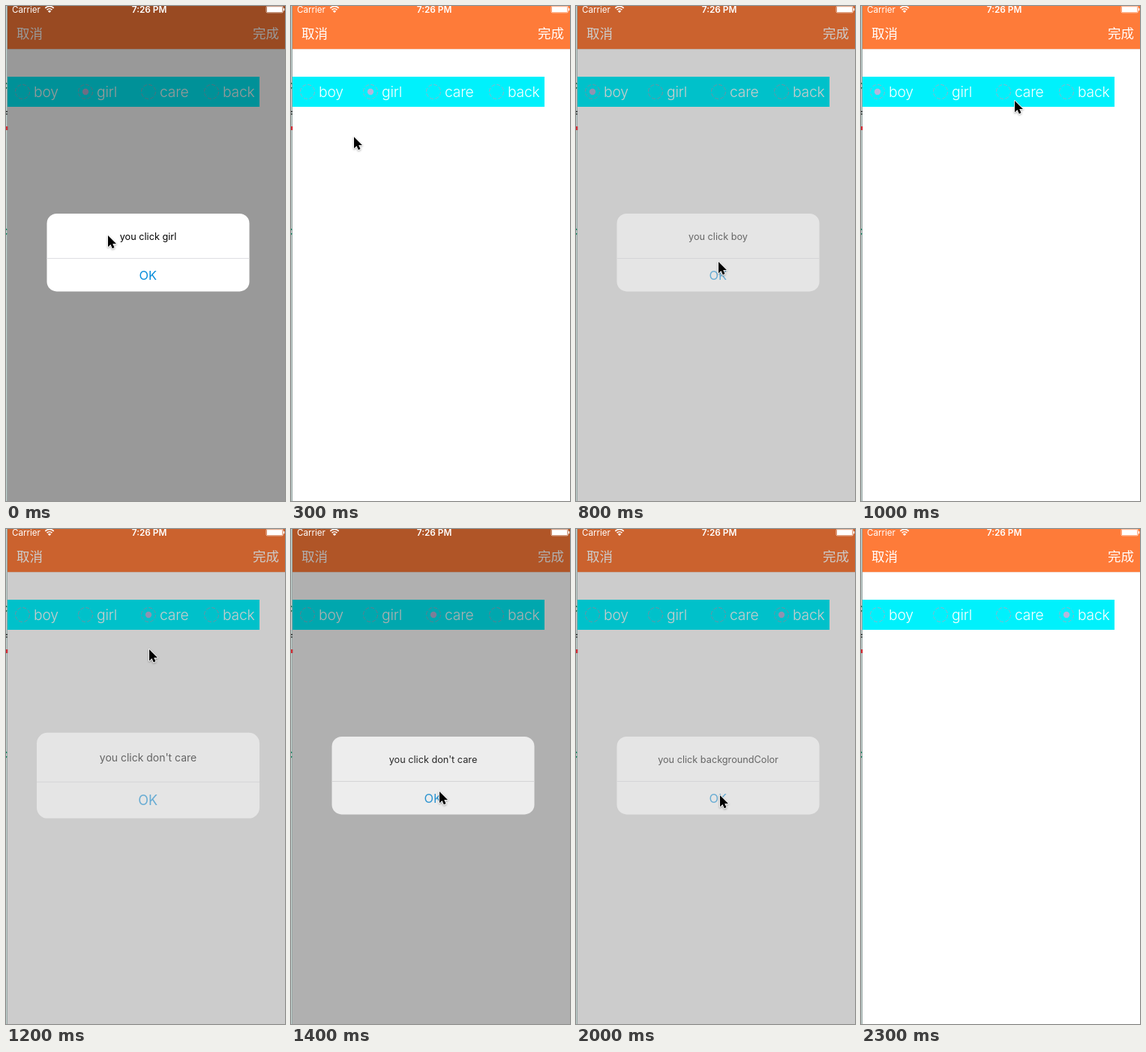
An HTML page with a canvas that plays this animation: 372x658 px, repeating every 2400 ms.

```html
<!DOCTYPE html>
<html lang="zh">
<head>
<meta charset="utf-8">
<title>Radio buttons</title>
<style>
  html, body { margin: 0; width: 100%; height: 100%; overflow: hidden; background: #fff; }
  canvas { display: block; width: 372px; height: 658px; }
</style>
</head>
<body>
<canvas id="stage"></canvas>
<script>
const W = 372, H = 658, LOOP = 2400, STEP = 100;
const SANS = 'Inter, Roboto, sans-serif';
const CJK = '"Noto Sans CJK SC", "Noto Sans CJK", sans-serif';
const dpr = window.devicePixelRatio || 1;

function makeLayer(canvas) {
  canvas.width = W * dpr;
  canvas.height = H * dpr;
  const c = canvas.getContext('2d');
  c.scale(dpr, dpr);
  return c;
}
const ctx = makeLayer(document.getElementById('stage'));
const layer = makeLayer(document.createElement('canvas'));

const options = ['boy', 'girl', 'care', 'back'];

// Each alert: chosen option, message, fade-in and fade-out intervals
const alerts = [
  { pick: 1, text: 'girl', show: [-300, -100], hide: [100, 300] },
  { pick: 0, text: 'boy', show: [400, 600], hide: [700, 900] },
  { pick: 2, text: "don't care", show: [1100, 1300], hide: [1350, 1570] },
  { pick: 3, text: 'backgroundColor', show: [1560, 1755], hide: [1900, 2100] }
];

// Pointer path: time, x, y
const path = [
  [0, 136, 305], [100, 181, 351], [200, 172, 335], [300, 84, 174],
  [400, 22, 115], [500, 32, 135], [600, 118, 295], [700, 184, 352],
  [800, 190, 340], [900, 203, 205], [1000, 205, 126], [1100, 192, 114],
  [1200, 191, 160], [1300, 196, 330], [1400, 198, 349], [1500, 240, 225],
  [1600, 272, 118], [1700, 263, 184], [1800, 208, 325], [1900, 193, 353],
  [2200, 190, 356]
];

const ramp = (t, [a, b]) => Math.min(1, Math.max(0, (t - a) / (b - a)));

function pointerAt(t) {
  const i = path.findIndex(p => p[0] > t);
  if (i < 1) return null;
  const [t0, x0, y0] = path[i - 1], [t1, x1, y1] = path[i];
  const k = (t - t0) / (t1 - t0);
  return [x0 + (x1 - x0) * k, y0 + (y1 - y0) * k];
}

function rect(color, x, y, w, h) {
  ctx.fillStyle = color;
  ctx.fillRect(x, y, w, h);
}

function label(c, text, x, y, font, color, align = 'left', spacing = 0) {
  c.font = font;
  c.fillStyle = color;
  c.textAlign = align;
  c.letterSpacing = spacing + 'px';
  c.fillText(text, x, y);
}

function drawEdge() {
  rect('#c3d2ce', 0, 0, 1, H);
  rect('#98a5a4', 1, 0, 1, H);
  ctx.save();
  ctx.beginPath();
  ctx.rect(0, 58, 2.5, H);
  ctx.clip();
  const bit = (s, y, color) => label(ctx, s, 2.5, y, `17px ${SANS}`, color, 'right');
  bit('c', 111, '#08754f');
  bit('f', 153, '#222');
  bit('自', 219, '#241a5c');
  bit('c', 305, '#08835c');
  rect('#d02c35', 0, 160, 2.5, 5);
  ctx.restore();
}

function drawPage(picked) {
  rect('#fff', 2, 0, W, H);
  rect('#fe7b39', 2, 0, W, 57);
  rect('#e6b59c', 2, 57, W, 0.5);
  label(ctx, '取消', 14, 42.5, `300 17.5px ${CJK}`, '#fff');
  label(ctx, '完成', 329, 42.5, `300 17.5px ${CJK}`, '#fff');

  rect('#00f1fc', 2, 94, 336, 40);
  options.forEach((name, i) => {
    const x = 22 + 84 * i;
    ctx.strokeStyle = '#8db5cb';
    ctx.lineWidth = 1;
    ctx.setLineDash([5, 2.46]);
    ctx.beginPath();
    ctx.arc(x, 114, 9.5, 0, 2 * Math.PI);
    ctx.stroke();
    ctx.setLineDash([]);
    if (i === picked) {
      ctx.fillStyle = '#b5b6dc';
      ctx.beginPath();
      ctx.arc(x, 114, 4.2, 0, 2 * Math.PI);
      ctx.fill();
    }
    label(ctx, name, x + 15, 121, `300 19.3px ${SANS}`, '#fff', 'left', -0.2);
  });
}

function drawStatus() {
  label(ctx, 'Carrier', 8, 8.5, `11.6px ${SANS}`, '#fff');
  label(ctx, '7:26 PM', 191, 8.5, `600 11.8px ${SANS}`, '#fff', 'center');
  ctx.strokeStyle = ctx.fillStyle = '#fff';
  ctx.lineWidth = 1.6;
  for (const r of [4.8, 8]) {
    ctx.beginPath();
    ctx.arc(58, 8.5, r, -Math.PI * 0.75, -Math.PI * 0.25);
    ctx.stroke();
  }
  ctx.beginPath();
  ctx.moveTo(58, 9);
  ctx.arc(58, 9, 3, -Math.PI * 0.75, -Math.PI * 0.25);
  ctx.fill();

  ctx.lineWidth = 0.6;
  ctx.beginPath();
  ctx.roundRect(347, 0.3, 22.5, 8.6, 1.6);
  ctx.stroke();
  rect('#fff', 348, 1.1, 20.5, 7);
  rect('#fff', 370, 3, 1.2, 3.2);
}

function drawAlert(alert, alpha, scale) {
  layer.clearRect(0, 0, W, H);
  layer.save();
  layer.translate(189.5, 327.7);
  layer.scale(scale, scale);
  layer.translate(-189.5, -327.7);
  layer.fillStyle = '#fff';
  layer.beginPath();
  layer.roundRect(54.5, 276, 270, 103.4, 13);
  layer.fill();
  layer.fillStyle = '#dcdcdf';
  layer.fillRect(54.5, 335, 270, 0.9);
  label(layer, 'you click ' + alert.text, 189.5, 311, `12.7px ${SANS}`, '#000', 'center');
  label(layer, 'OK', 189.3, 363.7, `16.4px ${SANS}`, '#078ddb', 'center');
  layer.restore();
  ctx.globalAlpha = alpha;
  ctx.drawImage(layer.canvas, 0, 0, W, H);
  ctx.globalAlpha = 1;
}

function drawPointer([x, y]) {
  const arrow = new Path2D('M0 0V15.2L3.5 12L5.8 17.3L8.5 16.1L6.2 11H11Z');
  ctx.save();
  ctx.translate(x, y);
  ctx.lineJoin = 'round';
  ctx.shadowColor = 'rgba(0,0,0,.35)';
  ctx.shadowBlur = 2.5 * dpr;
  ctx.shadowOffsetY = dpr;
  ctx.strokeStyle = '#fff';
  ctx.lineWidth = 1.7;
  ctx.stroke(arrow);
  ctx.shadowColor = 'transparent';
  ctx.fillStyle = '#000';
  ctx.fill(arrow);
  ctx.restore();
}

function draw(t) {
  const alert = alerts.filter(a => a.show[0] < t).pop();
  const shown = ramp(t, alert.show);
  const alpha = shown * (1 - ramp(t, alert.hide));

  rect('#fff', 0, 0, W, H);
  drawPage(alert.pick);
  drawEdge();
  if (alpha > 0) rect(`rgba(0,0,0,${0.4 * alpha})`, 2, 0, W, H);
  drawStatus();
  if (alpha > 0) drawAlert(alert, alpha, 1 + 0.2 * (1 - shown));
  const pointer = pointerAt(t);
  if (pointer) drawPointer(pointer);
}

const start = performance.now();
function tick() {
  const t = (performance.now() - start) % LOOP;
  draw(Math.floor(t / STEP) * STEP);
  requestAnimationFrame(tick);
}
tick();
</script>
</body>
</html>
```
